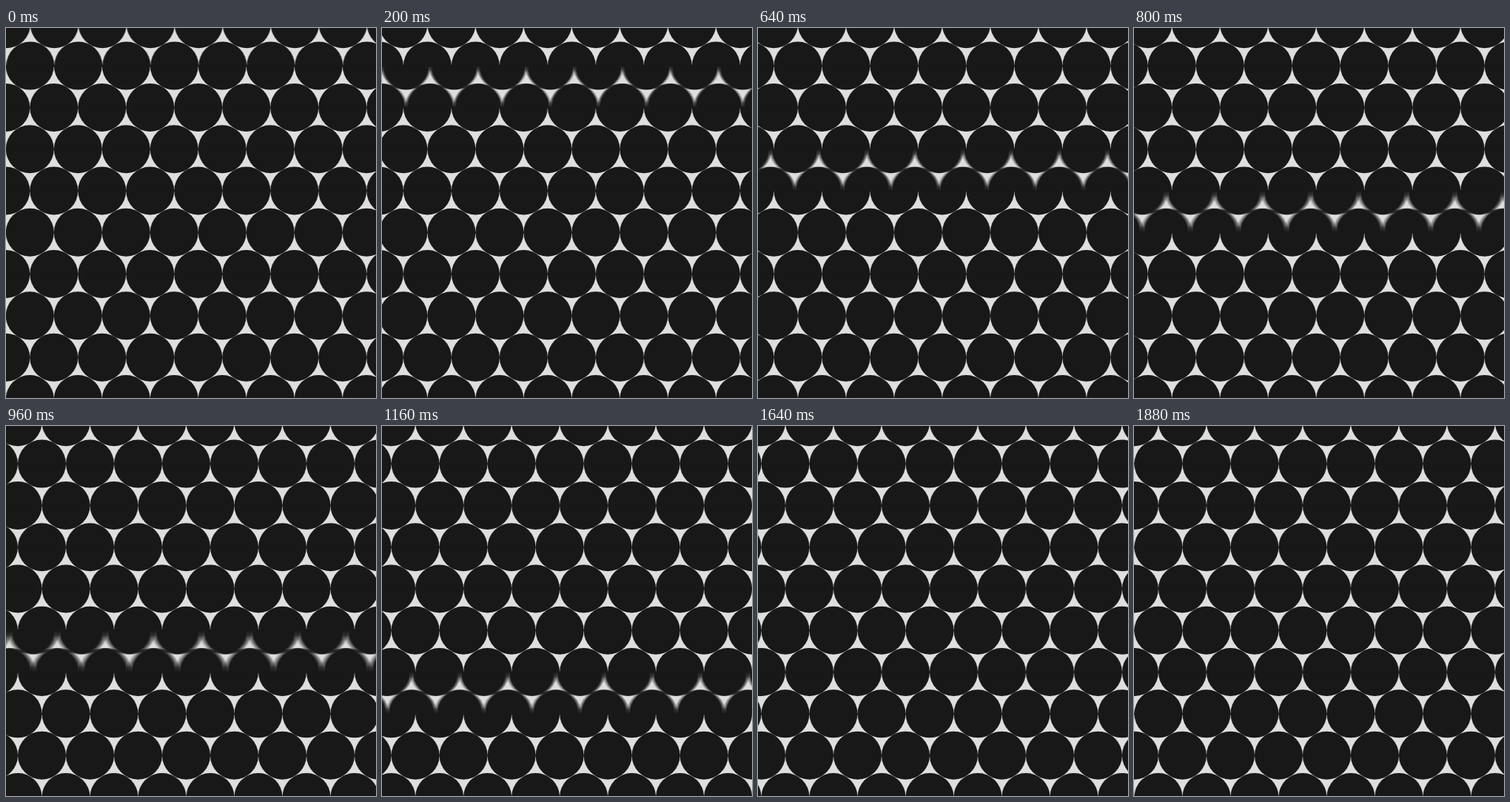
An HTML page with a canvas for the animation above (1.92 s loop, 500 by 500 pixels).

```html
<!DOCTYPE html>
<html>
<head>
<meta charset="utf-8">
<style>
html, body { margin: 0; width: 100%; height: 100%; overflow: hidden; background: #181818; }
canvas { display: block; }
</style>
</head>
<body>
<canvas id="stage" width="500" height="500"></canvas>
<script>
const SIZE = 500, LOOP = 1920, STEP = 40, SHUTTER = 28, SAMPLES = 8;
const DARK = '#181818', LIGHT = '#dedede';
const D = 65, R = D / 2, ROW = D * Math.sqrt(3) / 2, TOP = 51.1 - ROW;
const BANDS = 9, SLOT = LOOP / 11;

const ctx = document.getElementById('stage').getContext('2d');
const layer = document.createElement('canvas');
layer.width = layer.height = SIZE;
const pen = layer.getContext('2d');

const clamp = v => Math.min(1, Math.max(0, v));
const ease = u => u < 0.5 ? 2 * u * u : 1 - 2 * (1 - u) * (1 - u);

// A row of half discs: the lower halves hang from y, the upper halves rise from it.
function halfRow(row, shift, lower) {
  const y = TOP + row * ROW;
  const offset = shift + (row % 2 ? R : 0);
  const first = ((offset % D) + D) % D - D;
  for (let x = first; x < SIZE + D; x += D) {
    pen.beginPath();
    pen.arc(x, y, R, 0, Math.PI, !lower);
    pen.fill();
  }
  pen.fillRect(0, y - 0.6, SIZE, 1.2);
}

function drawPattern(t) {
  pen.fillStyle = LIGHT;
  pen.fillRect(0, 0, SIZE, SIZE);
  pen.fillStyle = DARK;
  const drift = -R * t / LOOP;
  for (let band = 0; band < BANDS; band++) {
    const shift = drift + R * ease(clamp(t / SLOT - band));
    halfRow(band, shift, true);
    halfRow(band + 1, shift, false);
  }
}

// Average several moments within the shutter time for motion blur.
function drawFrame(t) {
  for (let i = 0; i < SAMPLES; i++) {
    drawPattern(t + SHUTTER * i / (SAMPLES - 1));
    ctx.globalAlpha = 1 / (i + 1);
    ctx.drawImage(layer, 0, 0);
  }
}

const start = performance.now();
let last = -1;
function tick() {
  const t = (performance.now() - start + 0.5) % LOOP;
  const step = Math.floor(t / STEP);
  if (step !== last) {
    drawFrame(step * STEP);
    last = step;
  }
  requestAnimationFrame(tick);
}
tick();
</script>
</body>
</html>
```
